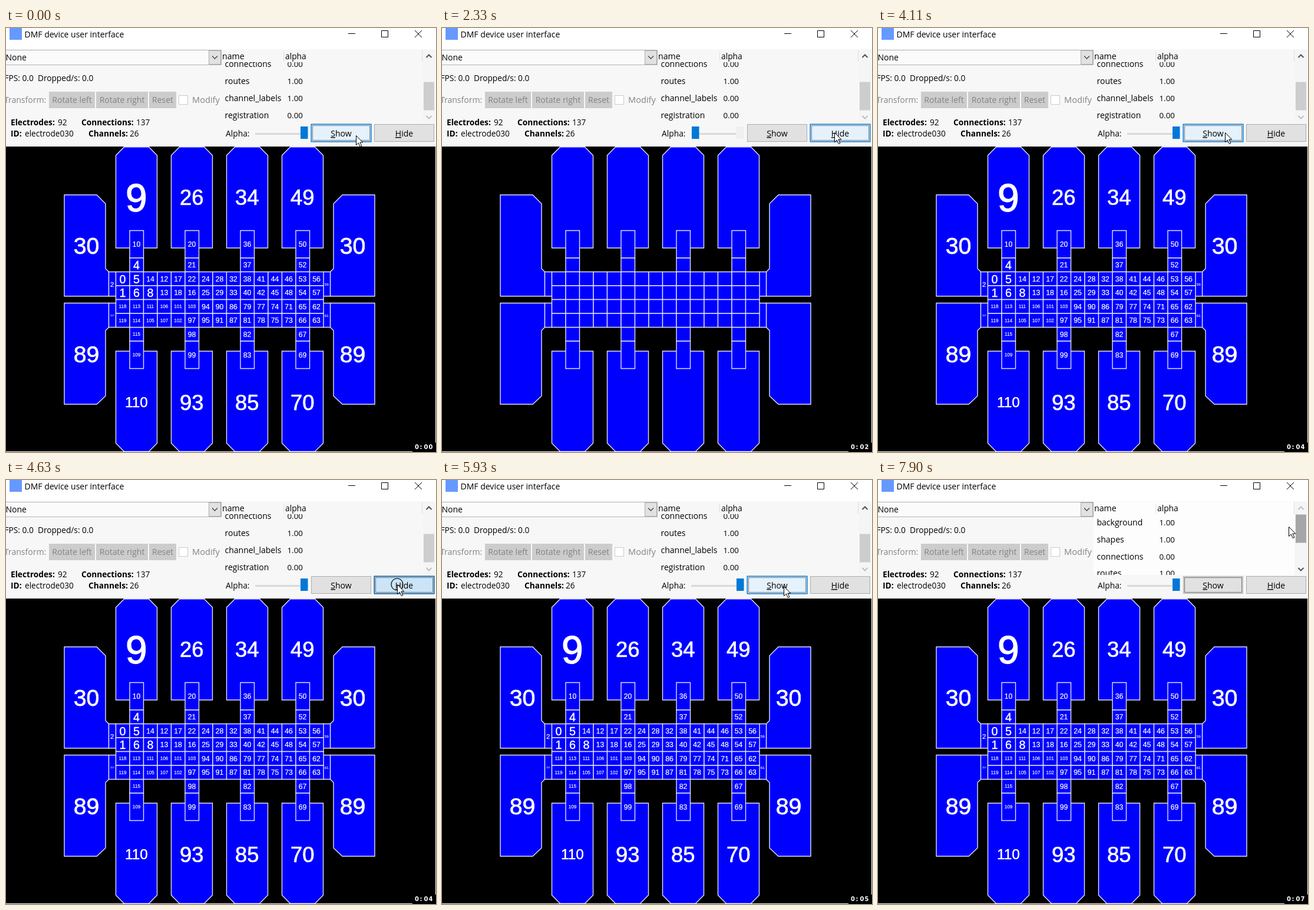
An HTML page that plays this animation: 730x719 px, repeating every 8000 ms.

```html
<!DOCTYPE html>
<html lang="en">
<head>
<meta charset="utf-8">
<title>Device user interface</title>
<style>
html, body { margin: 0; width: 100%; height: 100%; overflow: hidden; background: #fff; }
svg { display: block; }
text { font: 14px "Open Sans", "Noto Sans", sans-serif; white-space: pre; }
.b { font-weight: 700; }
.dim { fill: #838383; }
.mid { text-anchor: middle; }
.u { text-decoration: underline; }
#chip path { fill: #00f; stroke: #e0e0ff; stroke-width: 1.4; }
#labels text {
  font-family: "Liberation Sans", Arial, sans-serif; text-anchor: middle;
  fill: #fff; stroke: #fff; stroke-width: .02em;
}
#clock { font: 700 10px "DejaVu Sans", sans-serif; fill: #fff; }
</style>
</head>
<body>
<svg id="stage" width="730" height="719" viewBox="0 0 730 719">
  <defs>
    <clipPath id="listClip"><rect x="366" y="58" width="341" height="103"/></clipPath>
    <clipPath id="chipClip"><rect y="201" width="729" height="517"/></clipPath>
  </defs>
  <rect width="730" height="719" fill="#fff"/>
  <rect y="36" width="729" height="165" fill="#f7f7f7"/>

  <rect x="6" width="21" height="20" fill="#6699ff"/>
  <text x="31.5" y="16">DMF device user interface</text>
  <path d="M581 9.5h12M637.5 4.5h11v11h-11zM694 4l12 12M706 4l-12 12" fill="none" stroke="#000"/>

  <rect x="-2" y="37.5" width="367.5" height="25" fill="#fbfbfb" stroke="#b4b4b4"/>
  <rect x="344.5" y="38.5" width="20" height="23" fill="#e1e1e1" stroke="#adadad"/>
  <path d="M350 47.5l4.5 4.5l4.5-4.5" fill="none" stroke="#444" stroke-width="1.3"/>
  <text x="-.5" y="55">None</text>
  <text x="-2.5" y="90" style="font-size:13.7px">FPS: 0.0  Dropped/s: 0.0</text>
  <text x="-3" y="127" class="dim">Transform:</text>
  <g id="rotate"></g>
  <rect x="293.5" y="114.5" width="15" height="15" fill="#fff" stroke="#ccc"/>
  <text x="316" y="127" class="dim" style="font-size:14.6px">Modify</text>
  <g id="info"></g>

  <rect id="listBack" x="366" y="37" width="341" height="124" fill="#fdfdfd"/>
  <path d="M471.5 40v16M706.5 37v20" stroke="#dedede"/>
  <text x="367" y="52.5" style="font-size:14.2px">name</text>
  <text x="474" y="52.5" style="font-size:13.8px">alpha</text>
  <g clip-path="url(#listClip)"><g id="rows"></g></g>

  <rect x="708" y="37" width="21" height="124" fill="#f5f5f5"/>
  <path id="up" d="M713.5 50l4.5-4.5l4.5 4.5" fill="none" stroke-width="2"/>
  <path id="down" d="M713.5 149l4.5 4.5l4.5-4.5" fill="none" stroke-width="2"/>
  <rect id="thumb" x="709" width="18" height="48"/>

  <text x="373" y="184" style="font-size:13.8px">Alpha:</text>
  <rect x="423" y="178" width="90" height="3" fill="#d9d9d9"/>
  <rect id="trace" x="499" y="167" width="14" height="21" fill="#f0f0f0"/>
  <rect id="knob" y="167" width="12.5" height="21" fill="#0078d7"/>
  <g id="buttons"></g>

  <rect y="201" width="729" height="517" fill="#000"/>
  <g clip-path="url(#chipClip)"><g id="chip"></g><g id="labels"></g></g>
  <rect x="690" y="703" width="40" height="16" fill="#000"/>
  <text id="clock" x="694 702.5 709.5 717.5" y="714"></text>

  <circle id="ring" r="10" fill="none" stroke="#111" stroke-width="1.2"/>
  <path id="cursor" d="M.5.5v16l3.8-3.6l3 6.6l2.6-1.2l-3-6.3h4.8z" fill="#fff" stroke="#000"/>
</svg>
<script>
const $ = id => document.getElementById(id);

function add(parent, tag, attrs, text) {
  const el = document.createElementNS('http://www.w3.org/2000/svg', tag);
  put(el, attrs);
  if (text != null) el.textContent = text;
  return parent.appendChild(el);
}
function put(el, attrs) { for (const k in attrs) el.setAttribute(k, attrs[k]); }
const set = (id, attrs) => put($(id), attrs);

// Toolbar
for (const [x, w, s] of [[73, 78, 'Rotate left'], [153, 88, 'Rotate right'], [243, 46, 'Reset']]) {
  add($('rotate'), 'rect', { x, y: 108, width: w, height: 28, fill: '#ccc' });
  add($('rotate'), 'text', { x: x + w / 2, y: 127, class: 'dim mid' }, s);
}
for (const [x, y, key, vx, val] of [
  [8, 165, 'Electrodes:', 88, '92'], [128, 165, 'Connections:', 221, '137'],
  [8, 184, 'ID:', 32, 'electrode030'], [140, 184, 'Channels:', 210, '26']]) {
  add($('info'), 'text', { x, y, class: 'b', style: 'font-size:13.7px' }, key);
  add($('info'), 'text', { x: vx, y, style: 'font-size:13.6px' }, val);
}

// Layer list
const rowNames = ['background', 'shapes', 'connections', 'routes', 'channel_labels', 'registration'];
const values = rowNames.map((name, i) => {
  const y = 77 + i * 28.8;
  add($('rows'), 'text', { x: 371.5, y, style: 'font-size:14px' }, name);
  return add($('rows'), 'text', { x: 477.5, y, style: 'font-size:13.3px' }, i == 2 || i == 5 ? '0.00' : '1.00');
});

// Show and Hide
function makeButton(x, name) {
  const g = $('buttons'), y = 162, w = 104, h = 32;
  const face = add(g, 'rect');
  const dots = add(g, 'rect', { x: x + 3.5, y: y + 3.5, width: w - 7, height: h - 7,
    fill: 'none', stroke: '#000', 'stroke-dasharray': '1 1' });
  const caption = add(g, 'text', { x: x + w / 2, y: 184, class: 'mid' });
  add(caption, 'tspan', { class: 'u' }, name[0]);
  add(caption, 'tspan', {}, name.slice(1));
  return (look, focus) => {
    const [fill, stroke, line] = looks[look];
    const inset = 2 - line / 2;
    put(face, { x: x + inset, y: y + inset, width: w - 2 * inset, height: h - 2 * inset,
      fill, stroke, 'stroke-width': line });
    put(dots, { visibility: focus ? 'visible' : 'hidden' });
  };
}
const looks = {
  idle: ['#e1e1e1', '#adadad', 1],
  hover: ['#e5f1fb', '#0078d7', 1.5],
  down: ['#cce4f7', '#005499', 1.5],
  fade: ['#e3e6e9', '#0078d7', 1.5]
};
const drawShow = makeButton(517, 'Show');
const drawHide = makeButton(624, 'Hide');

// Chip: electrodes and channel numbers
const P = 23.5, X0 = 186.5, Y0 = 413.5;

function electrode(points) {
  add($('chip'), 'path', { d: 'M' + points.map(p => p.join(' ')).join('L') + 'Z' });
}
// The number fills the width of its electrode, limited by the height
function label(s, x, y, w, h) {
  const size = Math.min(s.length == 1 ? w * .94 : w / s.length * 1.04, h * .84);
  add($('labels'), 'text', { x, y: y + size * .36, style: `font-size:${size.toFixed(2)}px` }, s);
}
function box(x, y, w, h, s) {
  electrode([[x, y], [x + w, y], [x + w, y + h], [x, y + h]]);
  label(s, x + w / 2 - .3, y + h / 2 + .3, w, h);
}

const arms = [
  ['9', '10', '4', '115', '109', '110'],
  ['26', '20', '21', '98', '99', '93'],
  ['34', '36', '37', '82', '83', '85'],
  ['49', '50', '52', '67', '69', '70']
];
arms.forEach(([top, t1, t2, b1, b2, bottom], i) => {
  const x = X0 + 4 * P * i, r = x + 70, m = x + P;
  electrode([[x, 216], [x + 14, 201.7], [r - 14, 201.7], [r, 216], [r, 373], [x, 373]]);
  electrode([[x, 548], [r, 548], [r, 704], [r - 14, 718.2], [x + 14, 718.2], [x, 704]]);
  label(top, x + 34.8, 287, 70, 171);
  label(bottom, x + 34.8, 634.5, 70, 171);
  box(m, 343.5, P, 46.5, t1);
  box(m, 390, P, P, t2);
  box(m, 507.5, P, P, b1);
  box(m, 531, P, 46.5, b2);
});

for (const flip of [false, true]) {
  const mx = x => flip ? 725 - x : x;
  const side = pts => electrode(pts.map(([x, y]) => [mx(x), y]));
  side([[99, 283], [154, 283], [169, 298], [169, 408], [174.5, 413.5], [174.5, 454.8], [99, 454.8]]);
  side([[99, 466.5], [174.5, 466.5], [174.5, 507.5], [169, 513], [169, 624], [154, 638], [99, 638]]);
  label('30', mx(136.5), 369, 75.5, 171);
  label('89', mx(136.5), 552.5, 75.5, 171);
  const sx = flip ? 538.5 : 174.5;
  box(sx, Y0, 12, 41.3, flip ? '59' : '2');
  box(sx, 466.5, 12, 41, flip ? '61' : '117');
}

[
  '0 5 14 12 17 22 24 28 32 38 41 44 46 53 56',
  '1 6 8 13 18 16 25 29 33 40 42 45 48 54 57',
  '118 113 111 106 101 103 94 90 86 79 77 74 71 65 62',
  '119 114 105 107 102 97 95 91 87 81 78 75 73 66 63'
].forEach((row, j) => row.split(' ').forEach((s, i) => box(X0 + i * P, Y0 + j * P, P, P, s)));

// Each step changes only the listed parts of the state
const LOOP = 8000;
const steps = [
  [0, { x: 594, y: 182, show: 'hover', hide: 'idle', focus: 'show', on: true, click: false,
        sec: 0, drag: 0, scroll: 0, thumb: '#cdcdcd' }],
  [980, { y: 180, show: 'down', click: true }],
  [1110, { sec: 1 }],
  [1240, { show: 'fade', click: false }],
  [1520, { x: 627 }],
  [1670, { x: 664, y: 178, show: 'idle', hide: 'hover' }],
  [1950, { x: 666, y: 177, hide: 'down', focus: 'hide', click: true }],
  [2050, { sec: 2 }],
  [2330, { hide: 'hover', click: false, on: false }],
  [2640, { x: 664, y: 176 }],
  [2790, { x: 590, y: 176, show: 'hover', hide: 'idle' }],
  [2940, { x: 589, y: 177 }],
  [3040, { sec: 3 }],
  [3450, { show: 'down', focus: 'show', click: true }],
  [3580, { show: 'hover', click: false, on: true }],
  [4110, { sec: 4 }],
  [4210, { x: 600, y: 176 }],
  [4360, { x: 664, y: 176, show: 'idle', hide: 'hover' }],
  [4630, { y: 177, hide: 'down', focus: 'hide', click: true }],
  [4900, { hide: 'hover', click: false, on: false }],
  [5160, { x: 650, y: 178, sec: 5 }],
  [5290, { x: 612, y: 179, show: 'hover', hide: 'idle' }],
  [5410, { x: 590, y: 180 }],
  [5530, { x: 580 }],
  [5660, { show: 'down', focus: 'show', click: true }],
  [5930, { show: 'hover', click: false, on: true }],
  [6200, { x: 600, y: 176, sec: 6 }],
  [6320, { x: 655, y: 150, show: 'idle' }],
  [6440, { x: 712, y: 118, thumb: '#a6a6a6' }],
  [6560, { y: 112 }],
  [6710, { y: 107, drag: 5, thumb: '#606060' }],
  [6840, { y: 102, drag: 10 }],
  [6970, { y: 96, drag: 16 }],
  [7220, { y: 84, drag: 28, scroll: .85, sec: 7 }],
  [7350, { y: 79, drag: 33, scroll: 1 }],
  [7500, { thumb: '#a6a6a6' }],
  [7900, { x: 697 }]
];
let last = {};
const states = steps.map(([t, change]) => [t, last = { ...last, ...change }]);

function draw(s) {
  drawShow(s.show, s.focus == 'show');
  drawHide(s.hide, s.focus == 'hide');
  set('cursor', { transform: `translate(${s.x} ${s.y})` });
  set('ring', { cx: s.x, cy: s.y, visibility: s.click ? 'visible' : 'hidden' });
  set('labels', { visibility: s.on ? 'visible' : 'hidden' });
  set('knob', { x: s.on ? 500 : 424 });
  set('trace', { visibility: s.on ? 'hidden' : 'visible' });
  values[4].textContent = s.on ? '1.00' : '0.00';
  set('rows', { transform: `translate(0 ${-68.5 * (1 - s.scroll)})` });
  set('listBack', { visibility: s.scroll ? 'visible' : 'hidden' });
  set('thumb', { y: 91.5 - s.drag, fill: s.thumb });
  set('up', { stroke: s.drag == 33 ? '#bfbfbf' : '#505050' });
  set('down', { stroke: s.drag ? '#505050' : '#bfbfbf' });
  $('clock').textContent = '0:0' + s.sec;
}

const start = performance.now();
let shown;
function tick() {
  const t = (performance.now() - start) % LOOP;
  const state = states.findLast(([at]) => at <= t)[1];
  if (state != shown) draw(shown = state);
  requestAnimationFrame(tick);
}
tick();
</script>
</body>
</html>
```
